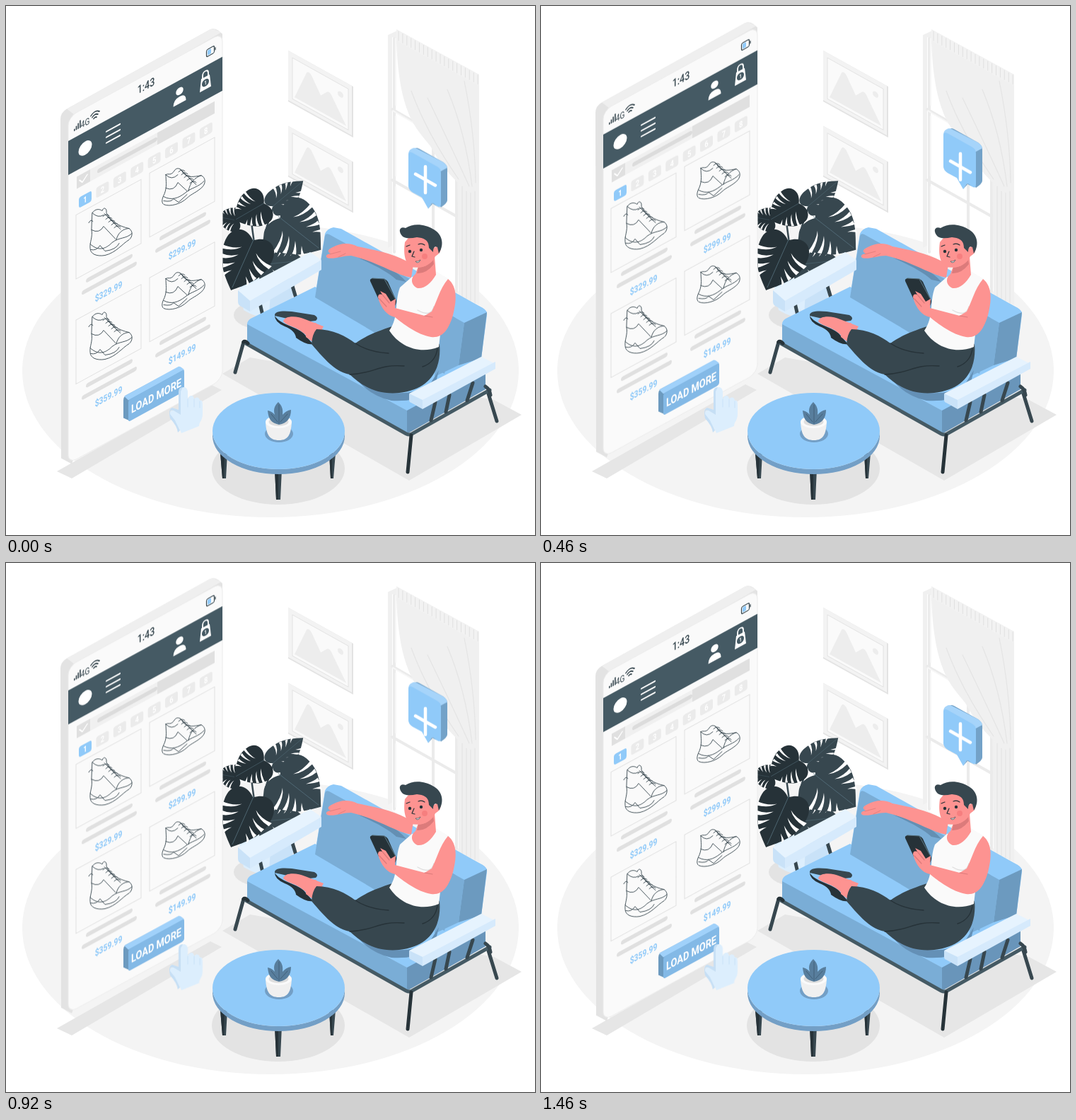
Recreate the animation shown at these times as an HTML page. Size 748 by 748 pixels, loop 1.5 s.

```html
<!DOCTYPE html>
<html lang="en">
<head>
<meta charset="utf-8">
<title>Load more</title>
<style>
  html, body { margin: 0; width: 100%; height: 100%; overflow: hidden; background: #fff; }
  svg { display: block; width: 100%; height: 100%; }
  text { font-family: Roboto, "Open Sans", sans-serif; text-anchor: middle; }
  .line { fill: none; stroke-linecap: round; stroke-linejoin: round; }
  .steel { stroke: #37474f; stroke-width: 5; }
  .skin { fill: #fd9391; }
</style>
</head>
<body>
<svg viewBox="0 0 748 748">
  <ellipse cx="374" cy="516" rx="351" ry="207" fill="#f4f4f4"/>
  <path d="M72 658L93 668L305 543L289 535Z" fill="#e6e6e6"/>
  <path d="M306 520L345 497L690 557L729 578L570 671Z" fill="#e6e6e6"/>
  <ellipse cx="385" cy="654" rx="94" ry="51" fill="#e3e3e3"/>

  <g id="frames"></g>

  <g id="window">
    <path d="M540 41L553 35V335L540 342Z" fill="#f0f0f0"/>
    <path d="M546 44L642 99V405L546 350Z" fill="#fff"/>
    <g class="line" stroke="#ebebeb" stroke-width="4" stroke-linecap="butt">
      <path d="M549 46V348M546 146L640 200M546 246L640 299M604 200V375M637 245V404"/>
    </g>
    <path d="M547 148L636 200M551 46V140M551 156V240M551 256V345" class="line" stroke="#f7f7f7" stroke-width="2"/>
    <path d="M638 220L669 225V423L640 408Z" fill="#f0f0f0"/>
    <path d="M552 33L669 97V262Q662 268 652 262C632 245 612 222 600 198C583 175 556 158 552 50Z" fill="#f0f0f0"/>
    <path d="M645 255V411M651 262V414M657 264V417M663 262V420M596 130Q630 200 655 255M624 118Q650 180 659 255M648 106Q663 180 664 250M573 120Q595 180 640 245" class="line" stroke="#e4e4e4" stroke-width="1.2"/>
    <path d="M552 33L669 97V113L552 49Z" fill="#f2f2f2"/>
    <path id="pleats" class="line" stroke="#e0e0e0" stroke-width="1"/>
  </g>

  <g id="plant"></g>

  <g id="sofa">
    <g class="line steel">
      <path d="M336 475L324 518M682 548L694 587"/>
      <path d="M359 420L364 442M405 396L411 416"/>
    </g>
    <path d="M451 322Q454 315 463 313L474 315L674 427Q681 431 680 437L672 498L600 545L437 410Z" fill="#90caf9"/>
    <path d="M341 452Q340 446 346 442L437 397L640 506L672 500L672 516L570 574Z" fill="#90caf9"/>
    <path d="M451 325Q452 321 457 323L640 424L620 520L437 412Z" fill="#7aadd6"/>
    <path d="M612 410L625 402L674 427L680 433L648 448L612 428Z" fill="#90caf9"/>
    <path d="M612 428L648 448L640 508L606 524Z" fill="#7aadd6"/>
    <path d="M648 448L680 433L672 498L640 508Z" fill="#6c9abf"/>
    <path d="M341 450L567 572V605L345 481Q341 479 341 474Z" fill="#7aadd6"/>
    <path d="M567 572L678 512V542L567 605Z" fill="#6995ba"/>
    <path d="M339 477L566 605Q570 607 574 605L684 543" class="line" stroke="#455a64" stroke-width="5"/>
    <path d="M336 475Q338 473 342 477M573 607L568 659" class="line" stroke="#263238" stroke-width="5"/>
    <path d="M678 538Q684 542 685 550" class="line steel"/>
    <path d="M328 402L430 348L446 359L345 417Z" fill="#e6f3fe"/>
    <path d="M328 402L345 417V432L331 424Q328 422 328 418Z" fill="#c9e2f8"/>
    <path d="M345 417L446 359V373L345 432Z" fill="#d6eafc"/>
  </g>

  <g id="man">
    <path d="M498 356C530 364 552 373 566 390L552 387C540 376 520 366 498 356Z" fill="#648fb3"/>
    <path class="skin" d="M573 384C548 379 524 361 488 353C476 353 462 359 454 356Q450 352 459 350Q451 346 462 341C475 334 487 335 497 340C520 345 548 349 576 366Z"/>
    <path d="M458 351L473 347M470 355L480 350" class="line" stroke="#e47f7d" stroke-width="1"/>
    <path d="M380 438C379 431 392 431 404 432L436 437Q443 441 438 445L420 447Z" fill="#37474f"/>
    <path class="skin" d="M392 446C394 437 412 438 423 443L449 453L437 475L420 462C410 453 398 453 392 446Z"/>
    <path d="M380 438C388 451 408 452 421 463L434 478Q425 480 410 469Q409 459 394 453Q380 447 380 438Z" fill="#263238"/>
    <path class="skin" d="M423 449L438 448L450 460L438 478L424 468Z"/>
    <path d="M490 520C520 550 570 556 600 534L612 515L604 548Q575 560 545 558Q510 550 490 520Z" fill="#6490b6"/>
    <path d="M439 457C462 457 481 467 494 477C509 466 525 460 546 453L613 478C616 511 602 542 556 547C527 550 505 539 486 521C466 518 449 498 432 478Q433 464 439 457Z" fill="#37474f"/>
    <path d="M494 477Q512 489 541 491M486 521C522 520 525 506 563 509M589 510Q607 504 610 485" class="line" stroke="#263238" stroke-width="1.4"/>
    <path d="M574 383L582 382L606 374L626 386C636 404 625 427 617 439L612 482C585 493 557 482 542 459C556 439 549 419 557 398Z" fill="#fafafa"/>
    <path d="M582 430Q601 441 605 425M606 431Q602 449 586 450" class="line" stroke="#dedede" stroke-width="1.3"/>
    <path class="skin" d="M583 368L606 354L608 380C601 392 592 400 582 399C573 395 571 385 579 379Z"/>
    <path d="M583 370Q596 369 604 358L605 365Q594 379 581 378Z" fill="#dc7b7b"/>
    <path class="skin" d="M564 334C562 348 563 363 573 369C589 372 602 366 607 354Q617 348 614 340Q610 337 606 342L602 326L574 322Z"/>
    <path d="M561 326C554 319 556 311 565 314C576 306 594 309 603 315C616 321 621 336 612 350L610 341Q604 338 604 348L598 342C598 330 590 328 581 327Q567 330 561 326Z" fill="#37474f"/>
    <g fill="#263238"><circle cx="571" cy="347" r="2.2"/><circle cx="587" cy="345" r="2.2"/></g>
    <path d="M566 340L571 338M583 337Q588 335 592 338M577 347L574 354L578 355" class="line" stroke="#263238" stroke-width="1.2"/>
    <path d="M579 361Q583 362 586 359Q585 363 581 363Z" fill="#fff" stroke="#37474f" stroke-width=".7"/>
    <circle cx="592" cy="354" r="4" fill="#f67f7f"/>
    <path d="M515 389Q514 386 518 385L535 386Q538 387 540 390L552 417Q552 424 546 427L527 415Z" fill="#263238"/>
    <path d="M518 385L535 386L551 415" class="line" stroke="#546e7a" stroke-width="1.2"/>
    <path class="skin" d="M625 386C639 397 637 418 632 437C626 458 617 470 601 468C582 465 561 449 550 440C539 438 530 427 526 412Q526 406 532 408L529 403L537 407L544 418L551 414L550 427L592 438L602 432C609 419 613 400 625 386Z"/>
    <path d="M532 408L542 420M528 414L538 425M592 438L603 440" class="line" stroke="#dc7b7b" stroke-width="1.2"/>
  </g>

  <g id="arm">
    <path d="M607 560L601 586M627 550L622 574M660 533L652 558" class="line steel"/>
    <path d="M570 548L672 496L692 506L589 563Z" fill="#e6f3fe"/>
    <path d="M570 548L589 557V570L573 561Q570 560 570 557Z" fill="#c9e2f8"/>
    <path d="M589 557L692 503V513L589 570Z" fill="#d6eafc"/>
  </g>

  <g id="table">
    <path d="M303 632H313L311 668H306ZM380 655H390L388 698H382ZM457 632H466L463 668H459Z" fill="#37474f"/>
    <path d="M303 632H309L308 668H306ZM380 655H385V698H382ZM457 632H461V668H459Z" fill="#263238"/>
    <path d="M292 601A93.500 54 0 0 0 479 601V608A93.500 54 0 0 1 292 608Z" fill="#739fc6"/>
    <ellipse cx="385.500" cy="601" rx="93.500" ry="54" fill="#90caf9"/>
    <ellipse cx="386" cy="605" rx="20" ry="12" fill="#739fc6"/>
    <path d="M367 588C368 606 372 614 386 614C399 614 403 606 404 588Z" fill="#f0f0f0"/>
    <ellipse cx="385.500" cy="588" rx="18.500" ry="9" fill="#fafafa"/>
    <ellipse cx="385.500" cy="588" rx="14" ry="6" fill="#dedede"/>
    <path d="M386 592C372 589 371 580 370 572Q376 573 380 578C377 568 382 563 385 560C390 565 392 570 391 578Q396 572 403 571C403 582 398 590 386 592Z" fill="#587e9d"/>
    <path d="M386 590L386 564M384 588L375 577M388 588L398 577" class="line" stroke="#42617b" stroke-width="1"/>
  </g>

  <g id="bubble">
    <path d="M569 212L578 203Q580 201 584 203L618 222Q624 226 624 232V276Q624 280 615 286Z" fill="#73a2c8"/>
    <path d="M569 211Q569 205 574 203Q577 201 581 203L618 222Q623 225 624 230L613 236Z" fill="#a6d4fa"/>
    <path d="M569 212Q569 206 575 209L609 228Q615 231 615 237V281Q615 288 609 284L602 280L597 288L588 272L575 265Q569 261 569 256Z" fill="#90caf9"/>
    <path d="M597 288L602 280L609 284L604 280Z" fill="#73a2c8"/>
  </g>
  <path id="plus" d="M593 228V265M579 238.500L607 254.500" class="line" stroke="#fff" stroke-width="4.500"/>

  <g id="phone">
    <path d="M77 161Q77 151 86 146L288 34Q294 31 300 35L306 40V60L93 648L78 640Z" fill="#e3e3e3"/>
    <path d="M86 146L288 34Q294 31 304 38L99 156Z" fill="#efefef"/>
    <g id="face" transform="matrix(1 -.547 0 1 88 157.500)"></g>
    <g id="shoes" class="line" stroke="#37474f" stroke-width=".9"></g>
  </g>
  <g id="hand">
    <path d="M247 545C247 537 256 537 257 545V556C259 549 266 550 266 556C269 551 274 554 274 558C277 556 278 560 278 564V577C278 586 273 588 273 594L248 604C246 597 240 590 234 583C230 578 231 571 237 572C242 573 244 576 247 578Z" fill="#dceefd"/>
    <path d="M247 545V578L237 572Q231 570 232 577L239 586L246 600L243 603Q242 594 232 583Q229 570 235 568L244 571V546Q244 539 250 539Z" fill="#c6dff5"/>
    <path d="M257 556V567M266 556V567M274 559V568" class="line" stroke="#c9e2f8" stroke-width="1"/>
  </g>
</svg>
<script>
const $ = id => document.getElementById(id);
const range = n => [...Array(n).keys()];
const rect = (x, y, w, h, r, fill, more = '') =>
  `<rect x="${x}" y="${y}" width="${w}" height="${h}" rx="${r}" fill="${fill}" ${more}/>`;
const line = (d, stroke, w) =>
  `<path class="line" d="${d}" stroke="${stroke}" stroke-width="${w}"/>`;
const label = (x, y, size, str, fill, weight = 600) =>
  `<text transform="translate(${x} ${y + size * .36}) scale(.78 1)" font-size="${size}" font-weight="${weight}" fill="${fill}">${str}</text>`;

const BLUE = '#90caf9', INK = '#37474f', DARK = '#263238', GREY = '#e0e0e0', PALE = '#fafafa';

// Wall pictures
$('frames').innerHTML = [63, 169.5].map(y => `
  <g transform="matrix(1 .555 0 1 399 ${y})">
    ${rect(0, 0, 92, 72, 0, '#e3e3e3')}${rect(0, 0, 90, 70, 0, '#f3f3f3')}
    ${rect(6, 7, 79, 58, 0, PALE, 'stroke="#e3e3e3"')}
    <path d="M9 61L26 17Q29 12 33 17L46 38L55 28Q58 25 61 29L82 61Z" fill="#ededed"/>
    <circle cx="74" cy="21" r="4" fill="#ededed"/>
  </g>`).join('');

$('pleats').setAttribute('d',
  range(20).map(i => `M${555 + i * 5.9} ${36 + i * 3.24}v13`).join(''));

// Plant: every leaf is one blade with paired, tapering slits
const slit = (i, s) => {
  const x = 30 + i * 15, tip = 54 - i * 9;
  return `<path d="M${x - 4} ${s * 15}Q${x + 6} ${s * 30} ${x + 6} ${s * tip}L${x + 13} ${s * (tip - 3)}Q${x + 9} ${s * 26} ${x - 4} ${s * 15}Z" fill="#fff"/>`;
};
const leaf = (x, y, turn, len, wide, fill) => `
  <g transform="translate(${x} ${y}) rotate(${turn}) scale(${len / 100} ${wide / 100})">
    <path d="M8 0C-14 -26 2 -54 32 -50C66 -48 86 -20 104 0C86 22 66 48 32 50C2 54 -14 26 8 0Z" fill="${fill}"/>
    ${range(4).map(i => slit(i, -1) + slit(i, 1)).join('')}
    ${line('M4 0H98', '#546e7a', 1)}
  </g>`;
$('plant').innerHTML = `
  <ellipse cx="362" cy="437" rx="40" ry="20" fill="#e3e3e3"/>
  <path d="M328 385H410L402 432Q368 450 336 430Z" fill="#dceefd"/>
  <path d="M375 385H410L402 432Q386 440 372 439Z" fill="#c9e2f8"/>
  ${line('M362 398Q356 340 378 285M362 398Q350 340 345 285M362 398Q375 360 386 305', INK, 2.5)}` + [
  [332, 304, 190, 34, 34, DARK],
  [360, 366, -6, 60, 54, INK],
  [374, 286, -40, 58, 38, INK],
  [368, 277, 150, 50, 54, DARK],
  [383, 296, 38, 76, 82, INK],
  [352, 326, 114, 80, 72, DARK]
].map(a => leaf(...a)).join('');

// Phone screen, drawn flat and skewed by its group
const card = (x, y, price) =>
  rect(x, y, 92, 90.5, 0, PALE, `stroke="${GREY}"`) +
  line(`M${x + 17} ${y + 101}h60M${x + 11} ${y + 115}h72`, GREY, 6) +
  label(x + 46, y + 133, 13.3, price, BLUE);

$('face').innerHTML =
  rect(0, 0, 218, 490, 12, PALE, 'stroke="#ececec"') +
  range(4).map(i => rect(8 + i * 2.7, 21.5 - i * 2.6, 1.6, 3 + i * 2.6, 0, INK)).join('') +
  label(24, 21, 13, '4G', INK, 400) +
  line('M32 16Q38 10 44 16M34 19Q38 15 42 19M36 22Q38 20 40 22', INK, 1.7) +
  label(110, 15.5, 16, '1:43', INK, 500) +
  rect(195.5, 12, 11, 10, 2, 'none', `stroke="${INK}" stroke-width="1.2"`) +
  rect(197, 13.5, 5, 7, 1, BLUE) + line('M208 15.500v3', INK, 1.3) +
  rect(0, 34, 218, 48, 0, '#455a64') +
  '<circle cx="24" cy="57" r="9.500" fill="#fff"/>' +
  line('M54 50H73M54 58H73M54 66H73', '#fff', 2.2) +
  '<circle cx="157.500" cy="49.500" r="5.200" fill="#fff"/>' +
  '<path d="M148.500 67Q148.500 57 157.500 57Q166.500 57 166.500 67Z" fill="#fff"/>' +
  line('M190 51V46Q190 41 194 41Q198 41 198 46V51', '#fff', 1.8) +
  '<path d="M188 49H200L202 67H186Z" fill="#fff"/><circle cx="194" cy="57.500" r="5" fill="#455a64"/>' +
  label(194, 57.5, 8, '1', '#fff', 700) +
  rect(12, 91, 195, 17, 0, '#f0f0f0') + rect(12, 91, 19, 17, 0, GREY) +
  rect(126, 91, 81, 17, 0, GREY) +
  line('M16 98L20 103L27 96', '#fff', 1.6) + line('M44 99.500H123', '#dcdcdc', 6) +
  range(8).map(i => {
    const x = 24 + i * 24.4, y = 129.5 - i * .55;
    return rect(x - 9, y - 7.5, 18, 15, 3, i ? '#ebebeb' : BLUE) + label(x, y, 12, i + 1, '#fff');
  }).join('') +
  card(11, 144.5, '$329.99') + card(115, 142, '$299.99') +
  card(11, 293, '$359.99') + card(115, 290, '$149.99') +
  '<path d="M78 443Q78 439 81 438L157 439L164 448L87 450V477L78 468Z" fill="#6c9abf"/>' +
  '<path d="M79 438L156 438Q159 439 164 447L85 447Z" fill="#a0d1fa"/>' +
  rect(85, 446.5, 79, 31, 3, '#83b9e6') +
  label(124.5, 462, 16.5, 'LOAD MORE', '#fff');

// Shoes
const laces = (x, y) => range(5).map(i =>
  `M${x + i * 4} ${y + i * 4}q5 -5 9 -1M${x + i * 4 + 2} ${y + i * 4 - 4}l7 6`).join('');
const boot = `M6 8C10 2 16 2 20 5C22 -1 27 1 26 8C32 20 44 27 58 30C64 34 63 42 58 46C48 52 40 64 24 68C12 70 3 66 3 58C2 50 7 42 5 32Z
  M6 8Q14 16 22 11M1 22Q4 16 7 20M3 52C14 62 24 60 34 50C44 42 54 45 62 37M4 60Q12 62 17 54L24 62Q40 60 44 51M40 46C42 36 50 30 58 30M5 32Q16 38 22 27L39 45` + laces(21, 13);
const trainer = `M6 9C10 6 13 12 19 2C23 -2 28 1 30 6C36 14 46 12 56 10C62 13 63 20 58 26C50 34 42 36 36 42C28 50 12 55 3 51C-1 48 1 42 4 36C8 26 6 18 6 9Z
  M6 9Q14 18 23 9M3 40C14 46 24 42 33 35C42 27 52 27 60 18M3 46Q14 48 17 43L24 48L36 37M38 32C40 20 47 13 56 10M6 28Q18 33 23 20L36 32` + laces(24, 5);
$('shoes').innerHTML = [
  [116, 285, boot], [220, 230, trainer], [116, 432, boot], [220, 377, trainer]
].map(([x, y, d]) => `<path transform="translate(${x} ${y})" d="${d}"/>`).join('');

// Floating parts
const loop = { duration: 1500, iterations: Infinity, delay: -21 };
const lift = { phone: 15, plus: 30, bubble: 45 };
for (const id in lift) {
  $(id).animate(
    [0, -lift[id], 0].map(y => ({ transform: `translateY(${y}px)` })), loop);
}
$('hand').style.transformOrigin = '255px 572px';
$('hand').animate([
  { transform: 'scale(1)' },
  { transform: 'scale(1)', offset: .4 },
  { transform: 'scale(1.06)', offset: .5 },
  { transform: 'scale(1)', offset: .6 },
  { transform: 'scale(1)' }
], loop);
</script>
</body>
</html>
```
